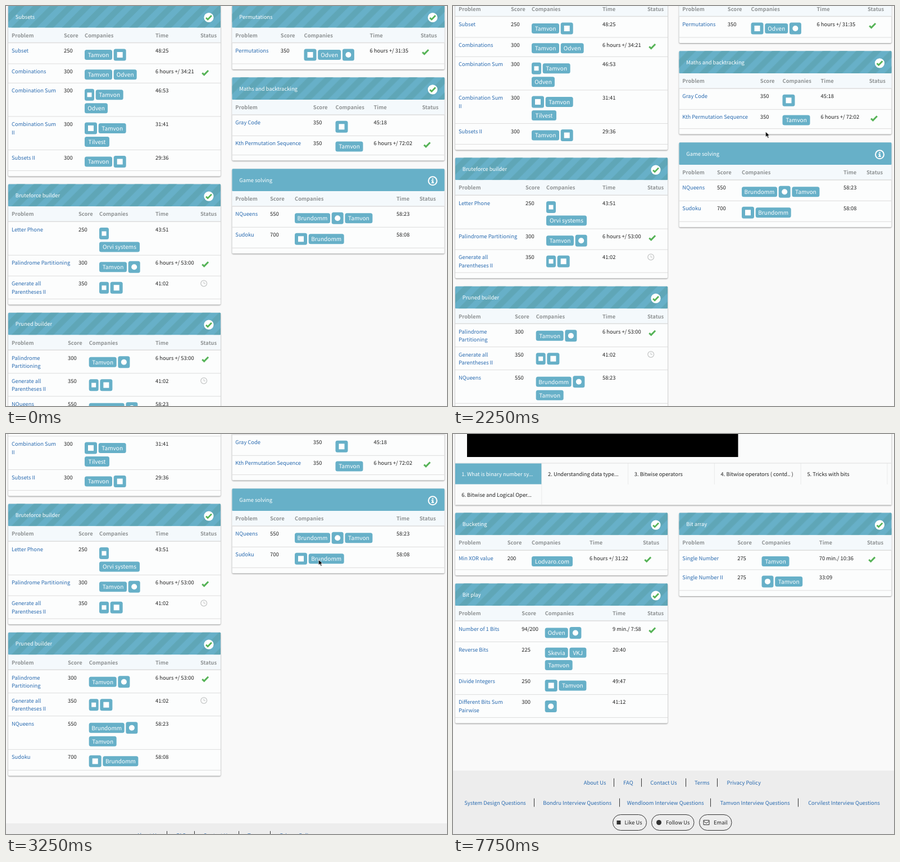
Write an HTML page that moves like this. It is 785 px wide and 713 px high and loops after 9000 ms.

```html
<!DOCTYPE html>
<html lang="en">
<head>
<meta charset="utf-8">
<title>Problem lists</title>
<style>
html, body { margin: 0; width: 100%; height: 100%; overflow: hidden; background: #f9f9f9; }
svg { display: block; width: 785px; height: 713px; }
text {
  font-family: "Noto Sans CJK SC", "Noto Sans CJK JP", "Noto Sans CJK KR", Lato, sans-serif;
  font-size: 9.37px; fill: #222; text-rendering: geometricPrecision; white-space: pre;
}
.link { fill: #2a6bb0; }
.light { fill: #fff; }
.head { fill: #8f9394; font-weight: 700; }
.tag { fill: #fff; font-size: 10.1px; font-weight: 500; }
.mid { text-anchor: middle; }
.teal { fill: #67b0c8; }
.card { fill: #fcfdfd; filter: drop-shadow(0 1px 1.3px rgba(0,0,0,.42)); }
.tick { fill: none; stroke: #56b357; stroke-width: 3; }
.rule { stroke: #ddd; }
.bar { stroke: #333; }
.pill { fill: none; stroke: #333; }

#list, #bits, #scroll, #cursor { animation: 9s step-end infinite; }
#list { animation-name: list; }
#bits { animation-name: bits; }
#scroll { animation-name: scroll; }
#cursor { animation-name: cursor; }
@keyframes list { 0% { visibility: visible; } 63.88%, 100% { visibility: hidden; } }
@keyframes bits { 0% { visibility: hidden; } 63.88%, 100% { visibility: visible; } }
@keyframes scroll {
  0% { transform: translateY(0); }
  19.44% { transform: translateY(-13px); }
  22.22% { transform: translateY(-29px); }
  25% { transform: translateY(-47px); }
  27.77% { transform: translateY(-79px); }
  30.55% { transform: translateY(-117px); }
  33.33%  { transform: translateY(-179px); }
  36.11%, 100% { transform: translateY(-193px); }
}
@keyframes cursor {
  0% { transform: translate(-50px, -50px); }
  8.33% { transform: translate(566.5px, 121px); }
  11.11% { transform: translate(556.5px, 224px); }
  41.66% { transform: translate(678.5px, 46px); }
  44.44% { transform: translate(703.5px, 3px); }
  47.22% { transform: translate(625.5px, -8px); }
  50% { transform: translate(-50px, -50px); }
  80.55% { transform: translate(782.5px, 45px); }
  83.33% { transform: translate(777.5px, 16px); }
  86.11%, 100% { transform: translate(-50px, -50px); }
}
</style>
</head>
<body>
<svg viewBox="0 0 785 713">
  <defs>
    <pattern id="stripes" width="30" height="30" patternUnits="userSpaceOnUse">
      <path d="M15 0H30L0 30V15ZM30 15V30H15Z" fill="#5fa6b7"/>
    </pattern>
  </defs>
  <g id="list"><g id="scroll"></g></g>
  <g id="bits"></g>
  <path id="cursor" d="M0 0V9.6L2.2 7.6L3.9 11.4L5.6 10.6L4 7H7Z" fill="#000" stroke="#fff" stroke-width=".7"/>
</svg>
<script>
const LEFT = 4, RIGHT = 402.5, WIDTH = 378;
const TITLES = ['Problem', 'Score', 'Companies', 'Time', 'Status'];

// key: [label, width]
const TAGS = {
  A: ['Tamvon', 49], D: ['Odven', 41], I: ['Tilvest', 44], E: ['Orvi systems', 72],
  Q: ['Brundomm', 63], B: ['Lodvaro.com', 73], N: ['Skevia', 41], H: ['VKJ', 30]
};
// key: [shape, width]
const MARKS = { w: ['square', 22], f: ['square', 17], g: ['circle', 21], y: ['circle', 21] };

const text = (x, y, s, cls = '') => `<text x="${x}" y="${y + 3.6}" class="${cls}">${s}</text>`;
const rect = (x, y, w, h, more) => `<rect x="${x}" y="${y}" width="${w}" height="${h}" ${more}/>`;
const line = (x1, y1, x2, y2, more = 'class="rule"') =>
  `<line x1="${x1}" y1="${y1}" x2="${x2}" y2="${y2}" ${more}/>`;
const disc = (x, y, r, more) => `<circle cx="${x}" cy="${y}" r="${r}" ${more}/>`;
const tick = (x, y, k = 1) =>
  `<path class="tick" transform="translate(${x} ${y}) scale(${k})" d="M-5.4 .6L-2 3.8L5.4 -3.8"/>`;

function mark(shape, x, y, size, fill) {
  return shape === 'circle'
    ? disc(x, y, size / 2, `fill="${fill}"`)
    : rect(x - size / 2, y - size / 2, size, size, `fill="${fill}"`);
}

function badge(solved) {
  const x = WIDTH - 21, y = 21.5;
  if (solved) return disc(x, y, 8.6, 'fill="#fff"') + tick(x, y, .92);
  return disc(x, y, 7.5, 'fill="none" stroke="#fff" stroke-width="2"') +
    `<path fill="#fff" d="M${x - 1.3} ${y - 4.4}h2.6v2.2h-2.6zM${x - 2.3} ${y - 1.2}h3.6v4h1.1v1.5h-4.7v-1.5h1.2v-2.5h-1.2z"/>`;
}

function status(kind, x, y) {
  if (kind === 'done') return tick(x + 8.7, y + 15.8);
  if (kind !== 'late') return '';
  return disc(x + 6.2, y + 13.3, 5.4, 'fill="none" stroke="#c6c8c8" stroke-width="1.3"') +
    `<path d="M${x + 6.2} ${y + 10}v3.6h2.8" fill="none" stroke="#c6c8c8"/>`;
}

const hasMark = keys => [...keys].some(k => MARKS[k]);

function tagLine(keys, x, y) {
  let out = '';
  for (const k of keys) {
    const [label, w] = TAGS[k] || MARKS[k];
    if (TAGS[k]) {
      out += rect(x, y - 9, w, 18, 'rx="3.5" class="teal"') + text(x + w / 2, y + .3, label, 'tag mid');
    } else {
      out += rect(x, y - 10.5, w, 21, 'rx="3.5" class="teal"') + mark(label, x + w / 2, y, k === 'f' ? 8 : 10, '#fff');
    }
    x += w + 2.7;
  }
  return out;
}

// row: problem | score | tags | time | status, with / for a line break
function panel(x, y, title, cols, rows, solved = true) {
  let top = 67, body = '';
  for (const row of rows) {
    const [name, score, tags, time, state] = row.split('|');
    const names = name.split('/'), lines = tags.split('/');
    const tall = hasMark(lines[0]), first = tall ? 21 : 19.3;
    names.forEach((s, i) => body += text(cols[0], top + 13.4 + i * 14.8, s, 'link'));
    body += text(cols[1], top + 13.4, score) + text(cols[3], top + 13.4, time);
    lines.forEach((keys, i) => body += tagLine(keys, cols[2], top + first + i * (tall ? 24 : 22.3)));
    body += status(state, cols[4], top);
    const base = (tall ? 37 : 34.3) + (lines.length - 1) * 22.6;
    top += Math.max(base, names.length > 1 ? 41 : 0);
    body += line(0, top, WIDTH, top);
  }
  const header = more => rect(0, 0, WIDTH, 39.7, more);
  return `<g transform="translate(${x} ${y})">` +
    rect(0, 0, WIDTH, top + 10, 'rx="2" class="card"') +
    header('rx="1.5" class="teal"') + (solved ? header('rx="1.5" fill="url(#stripes)"') : '') +
    rect(0, 39.7, WIDTH, 27, 'fill="#f4f9fc"') +
    line(0, 66.6, WIDTH, 66.6, 'class="rule" stroke-width="1.5"') +
    text(12.8, 20, title, 'light') + badge(solved) +
    TITLES.map((s, i) => text(cols[i], 53.3, s, 'head')).join('') + body + '</g>';
}

function footer(y) {
  const links = (dy, items, bars) =>
    items.map(([x, s]) => text(x, dy, s, 'link mid')).join('') +
    bars.map(x => line(x, dy - 7.5, x, dy + 7.5, 'class="bar"')).join('');
  const pill = (x, w) => rect(x, 78.5, w, 28, 'rx="14" class="pill"');
  const ask = ' Interview Questions';
  return `<g transform="translate(0 ${y})">` + rect(0, 0, 785, 130, 'fill="#ededed"') +
    links(21.3, [[252.5, 'About Us'], [312, 'FAQ'], [375, 'Contact Us'], [443.3, 'Terms'], [517.7, 'Privacy Policy']],
      [286.5, 335.5, 414.5, 470.5]) +
    links(57, [[75, 'System Design Questions'], [221.2, 'Bondru' + ask], [378.2, 'Wendloom' + ask],
      [537.5, 'Tamvon' + ask], [696, 'Corvilest' + ask]], [144.5, 296.5, 458.5, 614.5]) +
    pill(284.5, 60) + pill(353.5, 75.5) + pill(438.5, 57.5) +
    mark('square', 295, 92.5, 7, '#333') + mark('circle', 366.5, 92.5, 9, '#333') +
    `<path d="M446 88.5h10v8h-10zM446 90l5 3.8l5-3.8" fill="none" stroke="#333"/>` +
    text(305.5, 92.7, 'Like Us') + text(379, 92.7, 'Follow Us') + text(464, 92.7, 'Email') + '</g>';
}

function lesson() {
  const tabs = ['1. What is binary number sy...', '2. Understanding data type...', '3. Bitwise operators',
    '4. Bitwise operators ( contd.. )', '5. Tricks with bits', '6. Bitwise and Logical Oper...'];
  const step = 153.8;
  let out = rect(4, -20, 776.5, 146.5, 'class="card" style="fill:#fafbfb"') +
    rect(25, -1, 482.5, 42, 'fill="#000"') + line(4, 52, 780, 52) +
    rect(4, 52.5, 153.5, 37, 'class="teal"');
  tabs.forEach((s, i) => {
    const x = 4 + i % 5 * step, y = i < 5 ? 52.5 : 89.5;
    out += text(x + 11.2, y + 18.7, s, i ? '' : 'light') +
      line(x + step, y, x + step, y + 37, 'stroke="#d9d9d9" stroke-dasharray="1 1"');
  });
  return out;
}

document.getElementById('scroll').innerHTML =
  panel(LEFT, -1, 'Subsets', [6, 99, 136, 262, 342], [
    'Subset|250|Aw|48:25', 'Combinations|300|AD|6 hours +/ 34:21|done', 'Combination Sum|300|fA/D|46:53',
    'Combination Sum/II|300|wA/I|31:41', 'Subsets II|300|Aw|29:36']) +
  panel(LEFT, 317.6, 'Bruteforce builder', [6, 125, 162, 262, 342], [
    'Letter Phone|250|f/E|43:51', 'Palindrome Partitioning|300|Ag|6 hours +/ 53:00|done',
    'Generate all/Parentheses II|350|fw|41:02|late']) +
  panel(LEFT, 546.7, 'Pruned builder', [6, 106, 143.7, 262, 342], [
    'Palindrome/Partitioning|300|Ag|6 hours +/ 53:00|done', 'Generate all/Parentheses II|350|fw|41:02|late',
    'NQueens|550|Qg/A|58:23', 'Sudoku|700|wQ|58:08']) +
  panel(RIGHT, -1, 'Permutations', [5.8, 86.3, 128, 245, 335.5], [
    'Permutations|350|wDg|6 hours +/ 31:35|done']) +
  panel(RIGHT, 127.3, 'Maths and backtracking', [5.8, 144.3, 184, 252, 338.3], [
    'Gray Code|350|w|45:18', 'Kth Permutation Sequence|350|A|6 hours +/ 72:02|done']) +
  panel(RIGHT, 290.3, 'Game solving', [5.8, 67.5, 111.5, 292.5, 333.5], [
    'NQueens|550|QgA|58:23', 'Sudoku|700|wQ|58:08'], false) +
  footer(887);

document.getElementById('bits').innerHTML = lesson() +
  panel(LEFT, 140.6, 'Bucketing', [6, 92.7, 136, 239, 334], [
    'Min XOR value|200|B|6 hours +/ 31:22|done']) +
  panel(LEFT, 266.5, 'Bit play', [6, 118.3, 159.7, 280, 342], [
    'Number of 1 Bits|94/200|Dy|9 min./ 7:58|done', 'Reverse Bits|225|NH/A|20:40',
    'Divide Integers|250|wA|49:47', 'Different Bits Sum/Pairwise|300|g|41:12']) +
  panel(RIGHT, 140.6, 'Bit array', [5.8, 103.7, 147, 249.3, 334.5], [
    'Single Number|275|A|70 min./ 10:36|done', 'Single Number II|275|gA|33:09']) +
  footer(600);
</script>
</body>
</html>
```
